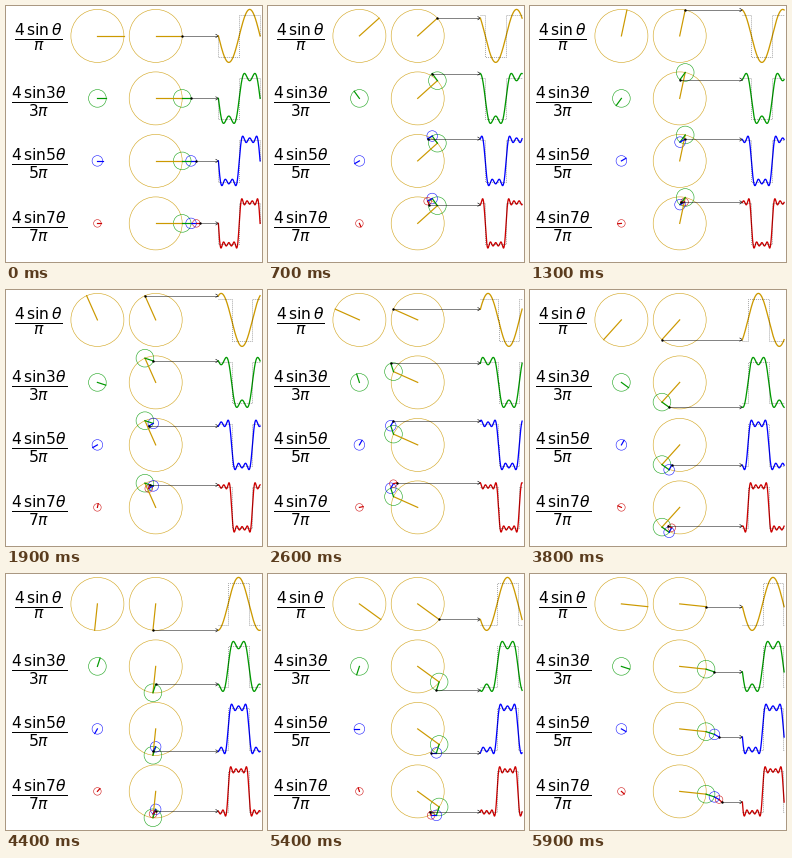
A matplotlib script for the animation above (6000 ms loop, 256x256 px).

```python
import numpy as np
import matplotlib.pyplot as plt
from matplotlib.animation import FuncAnimation
from matplotlib.patches import Circle

SIZE, DPI = 256, 100
FRAMES, INTERVAL = 60, 100
PX = 72 / DPI                      # points per pixel

COLORS = ["#cc9900", "#009900", "#0000ff", "#cc0000"]
HARMONICS = [1, 3, 5, 7]
ROW_Y = [29.9 + 62.5 * i for i in range(4)]
RADIUS = 26.5
LEVEL = RADIUS * np.pi / 4         # square wave height
TEXT_X, SPIN_X, SUM_X = 32.6, 91.4, 149.7
WAVE_X, WAVE_W = 212.4, 41.7

phase = np.linspace(0, 2 * np.pi, 481)
wave_x = WAVE_X + WAVE_W * phase / (2 * np.pi)

plt.rcParams["mathtext.fontset"] = "dejavusans"
fig = plt.figure(figsize=(SIZE / DPI, SIZE / DPI), dpi=DPI, facecolor="white")
ax = fig.add_axes([0, 0, 1, 1])
ax.set(xlim=(0, SIZE), ylim=(SIZE, 0))
ax.axis("off")


def line(color, width, **kw):
    return ax.plot([], [], color=color, lw=width * PX, **kw)[0]


def ring(x, y, n, color):
    patch = Circle((x, y), RADIUS / n, fill=False, ec=color,
                   lw=0.6 * PX, alpha=0.85)
    return ax.add_patch(patch)


def formula(n):
    if n == 1:
        return r"$\frac{4\,\mathrm{sin}\,\theta}{\pi}$"
    return rf"$\frac{{4\,\mathrm{{sin}}{n}\theta}}{{{n}\pi}}$"


class Row:
    """One partial sum: formula, single phasor, phasor chain and wave."""

    def __init__(self, index):
        self.y = ROW_Y[index]
        self.ns = HARMONICS[:index + 1]
        self.n, color = HARMONICS[index], COLORS[index]
        ax.text(TEXT_X, self.y + 9.4, formula(self.n), fontsize=16,
                ha="center", va="baseline", color="black")
        ring(SPIN_X, self.y, self.n, color)
        self.spin = line(color, 1.2)
        self.rings = [ring(SUM_X, self.y, n, c)
                      for n, c in zip(self.ns, COLORS)]
        self.arms = [line(c, 1.2) for c in COLORS[:index + 1]]
        self.arrow = line("black", 0.6, alpha=0.8)
        self.head = line("black", 0.6)
        self.dot = line("black", 0.3, marker="o", ms=2.4 * PX, mew=0)
        self.wave = line(color, 1.3)
        self.square = line("black", 0.55, ls=(0, (1.8, 1.8)), alpha=0.6,
                           dash_capstyle="butt", drawstyle="steps-mid")

    def update(self, theta):
        y = self.y
        a, r = self.n * theta, RADIUS / self.n
        self.spin.set_data([SPIN_X, SPIN_X + r * np.cos(a)],
                           [y, y - r * np.sin(a)])

        px, py = SUM_X, y
        for n, circle, arm in zip(self.ns, self.rings, self.arms):
            qx = px + RADIUS / n * np.cos(n * theta)
            qy = py - RADIUS / n * np.sin(n * theta)
            circle.center = px, py
            arm.set_data([px, qx], [py, qy])
            px, py = qx, qy
        self.dot.set_data([px], [py])
        self.arrow.set_data([px, WAVE_X], [py, py])
        self.head.set_data([WAVE_X - 2.6, WAVE_X, WAVE_X - 2.6],
                           [py - 1.6, py, py + 1.6])

        lag = theta - phase
        total = sum(np.sin(n * lag) / n for n in self.ns)
        self.wave.set_data(wave_x, y - RADIUS * total)
        sign = np.sign(np.round(np.sin(lag), 9))
        self.square.set_data(wave_x, y - LEVEL * sign)


rows = [Row(i) for i in range(4)]


def draw(frame):
    theta = 2 * np.pi * frame / FRAMES
    for row in rows:
        row.update(theta)
    return []


anim = FuncAnimation(fig, draw, frames=FRAMES, interval=INTERVAL,
                     repeat=True, repeat_delay=0, blit=False)
plt.show()
```
